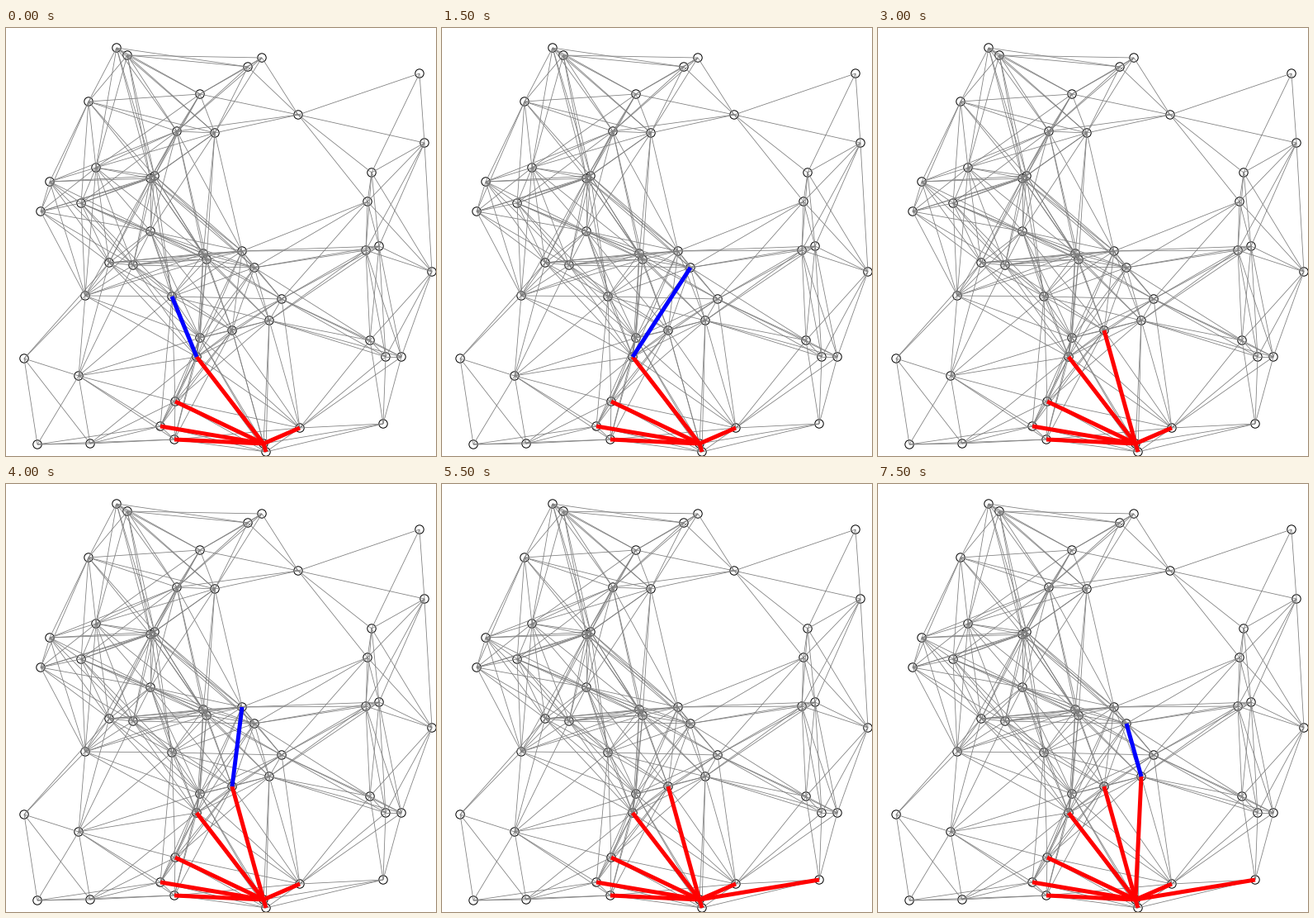
These frames come from a looping animation (521 by 518 pixels, 8000 ms). A matplotlib script:

```python
from itertools import combinations
from math import dist, inf

import matplotlib.pyplot as plt
from matplotlib.animation import FuncAnimation
from matplotlib.collections import EllipseCollection, LineCollection

W, H, DPI = 521, 518, 100
PX = 72 / DPI              # one pixel in points
REACH = 500 / 3            # nodes closer than this are linked
START, COUNT = 29, 16      # part of the search that is shown

# The first node is the start; neighbours are visited in list order.
NODES = [
    (312, 503), (134, 24), (147, 33), (293, 47), (310, 36),
    (100, 89), (235, 80), (354, 105), (207, 125), (253, 127),
    (501, 55), (507, 139), (443, 175), (438, 210), (109, 169),
    (53, 186), (42, 222), (91, 212), (175, 182), (180, 179),
    (125, 284), (239, 273), (286, 270), (201, 325), (154, 287),
    (175, 246), (436, 269), (334, 328), (301, 290), (243, 280),
    (96, 324), (452, 264), (319, 354), (274, 366), (235, 375),
    (231, 398), (516, 295), (441, 378), (460, 398), (479, 398),
    (457, 479), (22, 400), (88, 421), (38, 504), (102, 503),
    (205, 452), (187, 482), (204, 498), (315, 513), (356, 484),
]


def dijkstra(nodes):
    """Yield (tree, probe) segments for every visit and relaxation."""
    cost = {n: inf for n in nodes}
    cost[nodes[0]] = 0
    prev, tree, queue = {}, [], list(nodes)
    while queue:
        u = min(queue, key=cost.get)
        queue.remove(u)
        if u in prev:
            tree = tree + [(prev[u], u)]
        yield tree, []
        for v in queue:
            step = dist(u, v)
            if step < REACH and cost[u] + step < cost[v]:
                cost[v] = cost[u] + step
                prev[v] = u
                yield tree, [(u, v)]


steps = list(dijkstra(NODES))[START:START + COUNT]
links = [pair for pair in combinations(NODES, 2) if dist(*pair) < REACH]

fig = plt.figure(figsize=(W / DPI, H / DPI), dpi=DPI, facecolor="white")
ax = fig.add_axes([0, 0, 1, 1])
ax.set_xlim(0, W)
ax.set_ylim(H, 0)
ax.axis("off")


def add_lines(segments, color, width, zorder):
    lines = LineCollection(segments, colors=color, linewidths=width * PX,
                           capstyle="butt", zorder=zorder)
    return ax.add_collection(lines, autolim=False)


size = [10.4] * len(NODES)
ax.add_collection(EllipseCollection(
    size, size, [0] * len(NODES), units="x", offsets=NODES,
    offset_transform=ax.transData, facecolors="none", edgecolors="black",
    linewidths=PX, zorder=1), autolim=False)
add_lines(links, "#7f7f7f", 0.8, 2)
tree_lines = add_lines([], "#ff0000", 5, 3)
probe_line = add_lines([], "#0000ff", 5, 4)


def update(i):
    tree, probe = steps[i]
    tree_lines.set_segments(tree)
    probe_line.set_segments(probe)
    return tree_lines, probe_line


anim = FuncAnimation(fig, update, frames=COUNT, interval=500,
                     repeat=True, repeat_delay=0)
plt.show()
```
